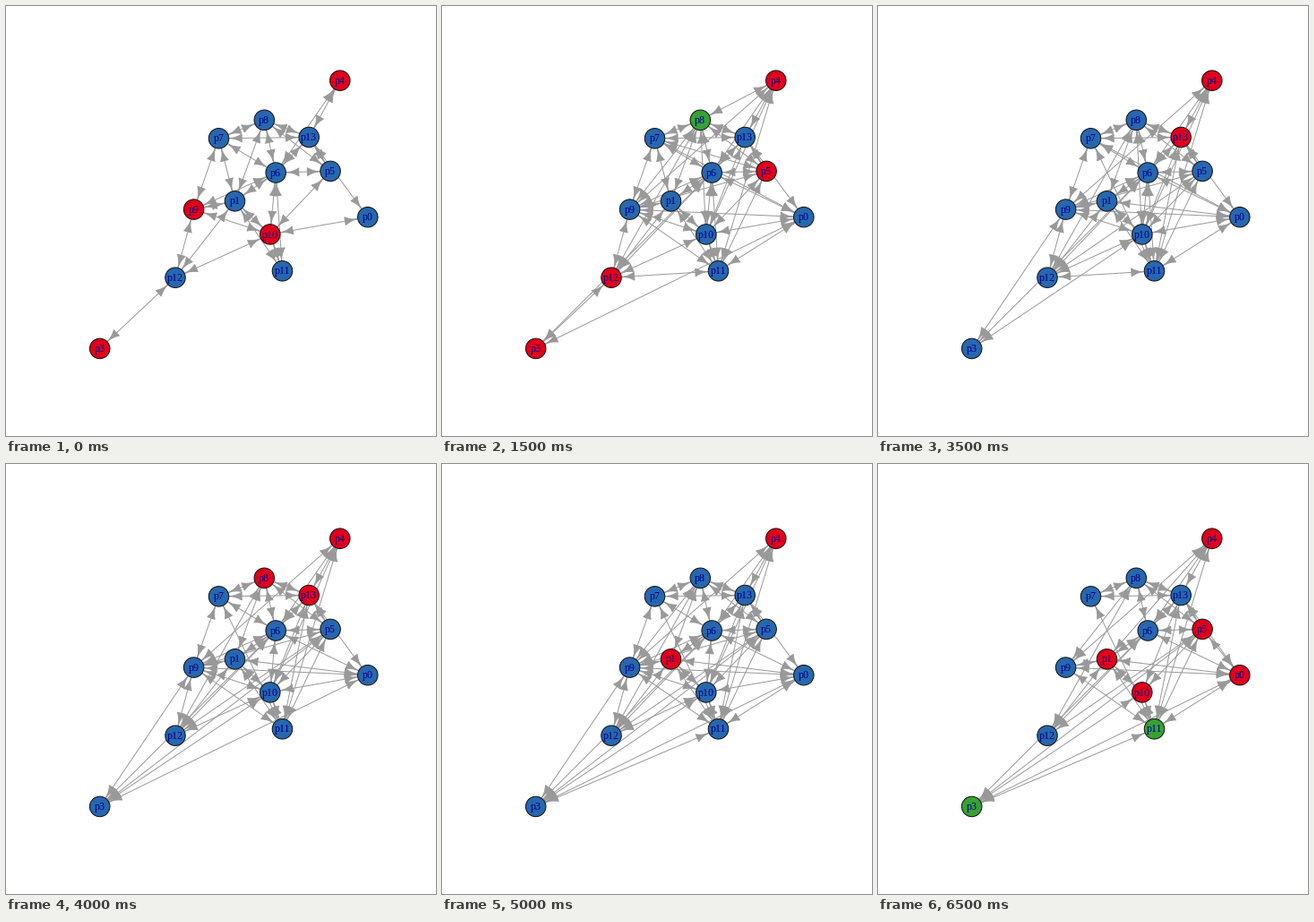
Write a matplotlib script that moves like this. It is 480 px wide and 480 px high and loops after 7 s.

```python
from itertools import combinations

import numpy as np
import matplotlib.pyplot as plt
from matplotlib.animation import FuncAnimation
from matplotlib.collections import LineCollection, PolyCollection
from matplotlib.patches import Circle

SIZE, DPI = 480, 100
PX = 72 / DPI
STEPS, STEP_MS = 14, 500
RADIUS, HEAD_LEN, HEAD_HALF = 11.25, 14.4, 4.4
NEAR = 62  # nodes closer than this stay linked throughout
GREY, BLUE, RED, GREEN = "#999999", "#2767ae", "#e0001b", "#37a232"

NODES = {
    0: (403.8, 235.7), 1: (255.5, 217.8), 3: (104.7, 382.4), 4: (372.8, 83.2),
    5: (362.1, 184.4), 6: (301.2, 186), 7: (237.5, 147.8), 8: (288.3, 127.3),
    9: (209.6, 227.1), 10: (294.8, 254.9), 11: (308.5, 295.8),
    12: (189, 303.2), 13: (338.2, 146.5),
}

# (first step, last step): far links alive in that window
LINKS = {
    (0, 13): "13-0 13-4 13-7 5-8 5-10 4-6 1-11 1-12",
    (0, 12): "10-12",
    (0, 10): "6-7 6-9 6-10 7-9 9-10 9-12 0-10 1-8",
    (0, 7): "6-11",
    (0, 5): "1-7 3-12",
    (1, 13): "4-9 4-11 10-13 6-12 0-6 5-11 8-12 3-6",
    (1, 10): "0-9 5-9 4-10",
    (1, 7): "0-7 8-10 11-12 0-11",
    (1, 5): "5-7 0-3 4-8",
    (1, 3): "8-9 9-11",
    (4, 13): "0-1",
    (4, 5): "7-10 3-8",
    (6, 13): "5-12 3-10 11-13 7-11",
    (6, 10): "3-9",
    (8, 13): "3-5 0-3 9-11",
    (10, 13): "8-9 3-11 0-11",
    (11, 12): "4-8 3-7 1-3",
    (12, 13): "1-4 0-5 0-9",
}

# the same windows for lit nodes
REDS = {
    (0, 13): "4", (0, 4): "3", (0, 0): "9 10", (1, 3): "12", (3, 5): "5",
    (5, 5): "1", (6, 6): "3", (6, 9): "13", (8, 8): "8",
    (9, 9): "6 7 9 10 12", (9, 13): "1", (11, 11): "3", (13, 13): "0 5 10",
}
GREENS = {(3, 3): "8", (12, 13): "3", (13, 13): "11"}


def alive(windows, step):
    return [item for (first, last), text in windows.items()
            if first <= step <= last for item in text.split()]


def arrow(a, b):
    """Shaft and two flared heads of a double arrow between node rims."""
    p, q = np.array(NODES[a]), np.array(NODES[b])
    d = (q - p) / np.hypot(*(q - p))
    n = np.array([-d[1], d[0]])
    t = np.sqrt(np.linspace(0, 1, 9))[:, None]

    def head(tip, back):
        spine, flare = tip + back * HEAD_LEN * t, n * HEAD_HALF * t ** 2
        return np.vstack([spine + flare, (spine - flare)[::-1]])

    start, end = p + d * RADIUS, q - d * RADIUS
    return (start, end), (head(start, d), head(end, -d))


near_links = [(a, b) for a, b in combinations(NODES, 2)
              if np.hypot(*np.subtract(NODES[a], NODES[b])) < NEAR]

fig = plt.figure(figsize=(SIZE / DPI, SIZE / DPI), dpi=DPI, facecolor="white")
ax = fig.add_axes([0, 0, 1, 1])
ax.set(xlim=(0, SIZE), ylim=(SIZE, 0))
ax.axis("off")

shafts = LineCollection([], colors=GREY, linewidths=PX, zorder=1)
heads = PolyCollection([], facecolors=GREY, edgecolors=GREY,
                       linewidths=PX, zorder=1)
ax.add_collection(shafts, autolim=False)
ax.add_collection(heads, autolim=False)

discs = {}
for k, (x, y) in NODES.items():
    discs[k] = ax.add_patch(Circle((x, y), RADIUS, ec="#101010", lw=PX, zorder=2))
    ax.text(x, y + 3.6, f"p{k}", family="Liberation Serif", size=12 * PX,
            color="#00008b", ha="center", va="baseline", zorder=3)


def draw(step):
    far = [tuple(map(int, s.split("-"))) for s in alive(LINKS, step)]
    arrows = [arrow(a, b) for a, b in near_links + far]
    shafts.set_segments([shaft for shaft, _ in arrows])
    heads.set_verts([h for _, both in arrows for h in both])
    reds, greens = alive(REDS, step), alive(GREENS, step)
    for k, disc in discs.items():
        name = str(k)
        disc.set_facecolor(GREEN if name in greens else
                           RED if name in reds else BLUE)
    return [shafts, heads, *discs.values()]


anim = FuncAnimation(fig, draw, frames=STEPS, interval=STEP_MS,
                     repeat=True, repeat_delay=0, blit=False)
plt.show()
```
